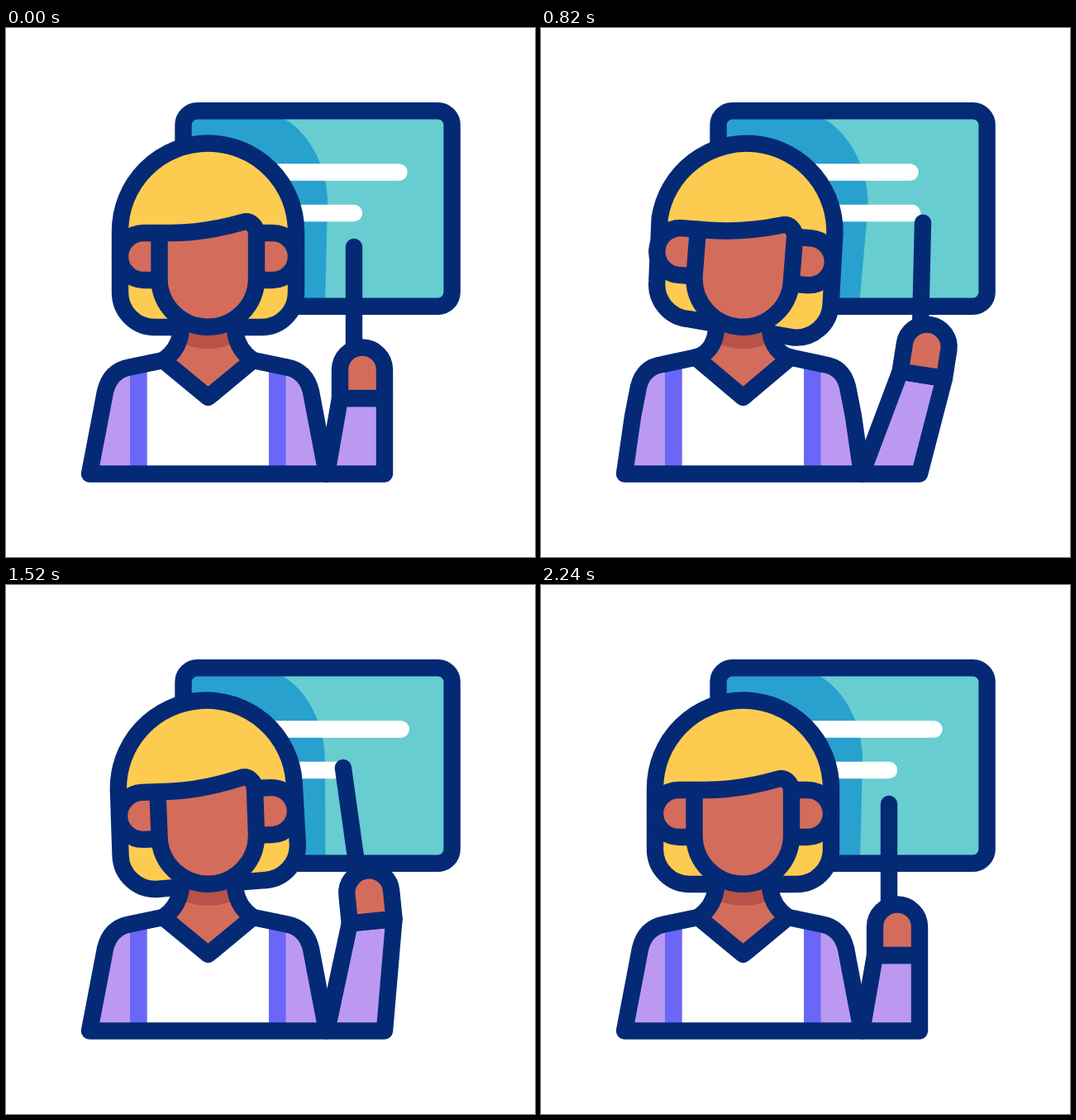
These frames come from a looping animation (640x640 px, 2420 ms). An HTML page:

```html
<!DOCTYPE html>
<html lang="en">
<head>
<meta charset="utf-8">
<title>Teacher at the board</title>
<style>
  html, body { margin: 0; width: 100%; height: 100%; overflow: hidden; background: #fff; }
  svg { display: block; width: 100vw; height: 100vh; }
  .ink { stroke: #042a76; stroke-width: 20.4; stroke-linejoin: round; stroke-linecap: round; }
  .chalk { stroke: #fff; stroke-width: 20.4; stroke-linecap: round; }
  .skin { fill: #d46c5c; }
  .hair { fill: #fdcb50; }
  .cloth { fill: #bb99f2; }
  .none { fill: none; }
</style>
</head>
<body>
<svg viewBox="0 0 640 640">
  <clipPath id="clip"><path id="clipBody"/></clipPath>

  <rect x="214.5" y="100.3" width="325.1" height="236.4" rx="17" fill="#67cdd1"/>
  <path id="shade" fill="#28a1cf"/>
  <path id="line1" class="chalk"/>
  <path id="line2" class="chalk"/>
  <rect x="214.5" y="100.3" width="325.1" height="236.4" rx="17" class="ink none"/>

  <path id="hair" class="ink hair"/>

  <path id="neck" class="skin"/>
  <path d="M210 360V380Q244.5 396 279 380V360Z" fill="#b75348"/>
  <path id="neckLine" class="ink none"/>
  <g clip-path="url(#clip)">
    <rect x="90" y="380" width="310" height="170" class="cloth"/>
    <rect x="150" y="380" width="188.5" height="170" fill="#6a67f8"/>
    <rect x="170.7" y="380" width="147.3" height="170" fill="#fff"/>
  </g>
  <path id="body" class="ink none"/>

  <g id="face">
    <path class="ink skin" d="M186 248H166.5A28.5 28.5 0 0 0 166.5 305H186M303 248H322.5A28.5 28.5 0 0 1 322.5 305H303"/>
    <path class="ink skin" d="M185.5 248H200C228 248 258 243 286 235C296 232 303 240 303 249V303A58.75 58.75 0 0 1 185.5 303Z"/>
  </g>

  <path id="sleeve" class="ink cloth"/>
  <g id="hand">
    <path id="pen" class="ink"/>
    <path class="ink skin" d="M-27 0V-34.5A27 27 0 0 1 27 -34.5V0Z"/>
  </g>
</svg>
<script>
const LOOP = 2420, RAD = Math.PI / 180;

const smooth = u => u * u * (3 - 2 * u);
const settle = u => smooth(u * (2 - u));
const mix = (a, b, u) => a + (b - a) * u;

// Head tilt in degrees and wrist position; all else follows from these
const rest = { tilt: 0, x: 431, y: 448 };
const up = { tilt: 0, x: 445.5, y: 419.5 };
const right = { tilt: 10.3, x: 482, y: 420 };
const left = { tilt: -5.5, x: 432, y: 403 };
const steps = [
  { from: rest, to: up, start: 0, end: 570, ease: settle },
  { from: up, to: right, start: 570, end: 1120, ease: smooth },
  { from: right, to: left, start: 1120, end: 1690, ease: smooth },
  { from: left, to: rest, start: 1690, end: 2240, ease: smooth }
];

const el = id => document.getElementById(id);
const put = (id, d) => el(id).setAttribute('d', d);
const move = (id, value) => el(id).setAttribute('transform', value);

function poseAt(t) {
  const { from, to, start, end, ease } = steps.find(s => t < s.end) ?? steps.at(-1);
  const u = ease(Math.min(1, (t - start) / (end - start)));
  return { tilt: mix(from.tilt, to.tilt, u), x: mix(from.x, to.x, u), y: mix(from.y, to.y, u) };
}

// The lower lobes swing further than the head itself
function hairPath(tilt) {
  const n = Math.abs(tilt), R = 106.5;
  const high = { x: -0.65 * n, y: -1.1 * n, turn: n * RAD };
  const low = { x: 0.4 * n, y: 1.7 * n, turn: 0 };
  const [l, r] = tilt > 0 ? [high, low] : [low, high];
  // The rising lobe follows the tilt on either side
  const lx = tilt > 0 ? -l.x : -l.x * 0.3, rx = tilt > 0 ? r.x : -r.x;
  const joint = (a, side) => `${244.5 + side * R * Math.cos(a)} ${246 - R * Math.sin(a)}`;
  return `M${joint(l.turn, -1)}A${R} ${R} 0 0 1 ${joint(r.turn, 1)}L${351 + rx} ${320 + r.y}` +
    `a42 42 0 0 1 -42 42L${180 + lx} ${362 + l.y}a42 42 0 0 1 -42 -42Z`;
}

const mirror = x => 489 - x;
const collar = lift => [190 - 3 * lift, 402 - 3.5 * lift];

function bodyPath(lift) {
  const [cx, cy] = collar(lift);
  const bx = 114.3 - 3.3 * lift, ax = 120 - 2 * lift, ay = 440 - 6 * lift;
  const qx = 126 - 2 * lift, qy = 415 - 5 * lift, sx = 149 - 2 * lift, sy = 410.5 - 3.5 * lift;
  return `M101 539.5L${bx} 470L${ax} ${ay}Q${qx} ${qy} ${sx} ${sy}L${cx} ${cy}L244.5 447` +
    `L${mirror(cx)} ${cy}L${mirror(sx)} ${sy}Q${mirror(qx)} ${qy} ${mirror(ax)} ${ay}` +
    `L${mirror(bx)} 470L388 539.5Z`;
}

function neckPath(lift) {
  const [x, y] = collar(lift);
  return `M211.5 369C209 384 201 395 ${x} ${y}L244.5 447L${mirror(x)} ${y}C288 395 280 384 277.5 369`;
}

function draw(t) {
  const { tilt, x, y } = poseAt(t);
  const lift = Math.min(1, Math.max(0, tilt / 4));
  const lean = (toRight, toLeft) => tilt * (tilt > 0 ? toRight : toLeft);

  const top = 337 + 1.28 * tilt, mid = 389 + 1.5 * tilt;
  put('shade', `M216 101H320L${top} 110C${top + 32} 129 ${mid} 170 ${mid} ${212 + lean(1, 0)}` +
    `L${386 - 0.25 * tilt} 336H216Z`);
  put('line1', `M300 174.5H${475.5 - lean(6.5, 1.1)}`);
  put('line2', `M300 224H${421 + 6.3 * tilt}`);

  const turn = `rotate(${tilt} 244.5 303)`;
  move('hair', turn);
  move('face', turn);
  put('hair', hairPath(tilt));

  const body = bodyPath(lift), neck = neckPath(lift);
  put('body', body);
  put('clipBody', body);
  put('neck', neck);
  put('neckLine', neck);

  const angle = lean(2, 2.65);
  const dx = 27 * Math.cos(angle * RAD), dy = 27 * Math.sin(angle * RAD);
  put('sleeve', `M388 539.5L${x - dx} ${y - dy}L${x + dx} ${y + dy}L458 539.5Z`);
  move('hand', `translate(${x} ${y}) rotate(${angle})`);

  const grip = -10 - lean(0.4, -0.6);
  put('pen', `M${grip} -61.5V${-183 + lean(0, 2.4)}`);
  move('pen', `rotate(${Math.max(-8, lean(-1.7, 1.1))} ${grip} -61.5)`);
}

let start;
function tick(now) {
  start ??= now;
  draw((now - start) % LOOP);
  requestAnimationFrame(tick);
}
draw(0);
requestAnimationFrame(tick);
</script>
</body>
</html>
```
